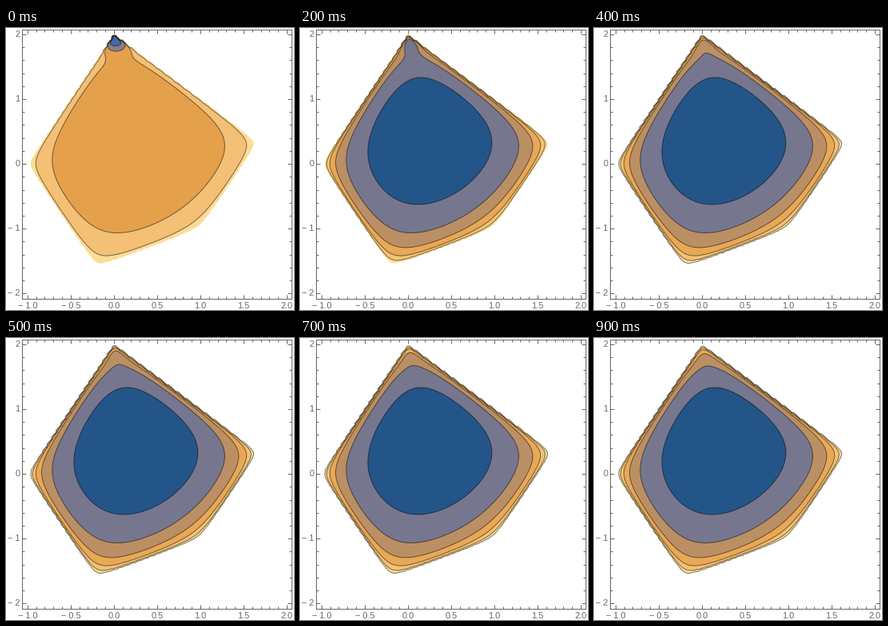
These frames come from a looping animation (360x353 px, 1000 ms). A matplotlib script:

```python
import numpy as np
import matplotlib.pyplot as plt
from matplotlib.animation import FuncAnimation
from matplotlib.ticker import FuncFormatter, MultipleLocator

W, H, DPI = 360, 353, 100
PX = 72 / DPI  # points per pixel
FRAMES, INTERVAL = 10, 100
GREY = "#666666"
CELLS = 112
FLOOR, OUTER = -2, -3  # lowest filled level, value beyond the boundary

plt.rcParams["font.family"] = "Liberation Sans"
plt.rcParams["ytick.alignment"] = "center"

# Constraints a*x + b*y <= c bounding the feasible pentagon
CONSTRAINTS = [(-2, 1, 2), (1, 1, 2), (2, -1, 3), (1, -2, 3), (-2, -1, 2)]

# One spare cell on each side lets contours close around the corners
X, Y = np.meshgrid(-1 + 3 * np.arange(-1, CELLS + 2) / CELLS,
                   -2 + 4 * np.arange(-1, CELLS + 2) / CELLS)
SLACKS = np.array([c - a * X - b * Y for a, b, c in CONSTRAINTS])
INSIDE = (SLACKS > 1e-9).all(axis=0)
BARRIER = np.log(np.where(INSIDE, SLACKS.prod(axis=0) / 2, 1))
WELL = 10 * np.exp(-20 * (X**2 + (Y - 2) ** 2))

WIDE_COLORS = ["#fddc95", "#f3c075", "#e5a04c", "#85808a", "#4468a8"]
FINE_COLORS = ["#fedf96", "#f3c278", "#e9a856", "#bb8f64", "#76778e", "#245589"]


def style(step):
    """Return the contour levels and the band colours from low to high."""
    if step == 1:
        return [0, 2, 4, 6], WIDE_COLORS
    if step == 2:
        return [-1, 0, 1, 2, 3], FINE_COLORS[:-1] + ["#355e99"]
    return [-1, 0, 1, 2, 3], FINE_COLORS


def label(value, decimals):
    sign = "\u2212 " if value < -1e-6 else ""
    return f"{sign}{abs(value):.{decimals}f}"


fig = plt.figure(figsize=(W / DPI, H / DPI), dpi=DPI, facecolor="white")
# Just under half a pixel, so the frame snaps to the intended pixel row
ax = fig.add_axes([20.4 / W, 14.4 / H, 337 / W, 337 / H])
ax.set(xlim=(-1.06, 2.06), ylim=(-2.08, 2.08))
ax.set_axisbelow(False)

for axis, major, minor, decimals in ((ax.xaxis, 0.5, 0.1, 1), (ax.yaxis, 1, 0.2, 0)):
    axis.set_major_locator(MultipleLocator(major))
    axis.set_minor_locator(MultipleLocator(minor))
    axis.set_major_formatter(
        FuncFormatter(lambda v, _, d=decimals: label(v, d)))

ax.tick_params(which="both", direction="in", top=True, right=True,
               color=GREY, labelcolor=GREY, width=PX, labelsize=11 * PX)
ax.tick_params(which="major", length=5 * PX)
ax.tick_params(which="minor", length=3 * PX)
ax.tick_params(axis="x", pad=4 * PX)
ax.tick_params(axis="y", pad=3 * PX)
for spine in ax.spines.values():
    spine.set(color=GREY, linewidth=PX)

artists = []


def draw(frame):
    while artists:
        artists.pop().remove()
    step = frame + 1
    field = np.where(INSIDE, np.maximum(BARRIER + WELL / step, OUTER), OUTER)
    levels, colors = style(step)
    bounds = [FLOOR] + levels
    for low, color in zip(bounds, colors):
        artists.append(ax.contourf(X, Y, field, [low, 60], colors=[color],
                                   antialiased=True, zorder=1))
    lines = levels if step < 4 else bounds
    artists.append(ax.contour(X, Y, field, lines, colors="black", alpha=0.5,
                              linewidths=PX, linestyles="solid", zorder=1.5))
    return []


anim = FuncAnimation(fig, draw, frames=FRAMES, interval=INTERVAL,
                     init_func=lambda: draw(0), repeat=True, repeat_delay=0,
                     blit=False)
plt.show()
```
